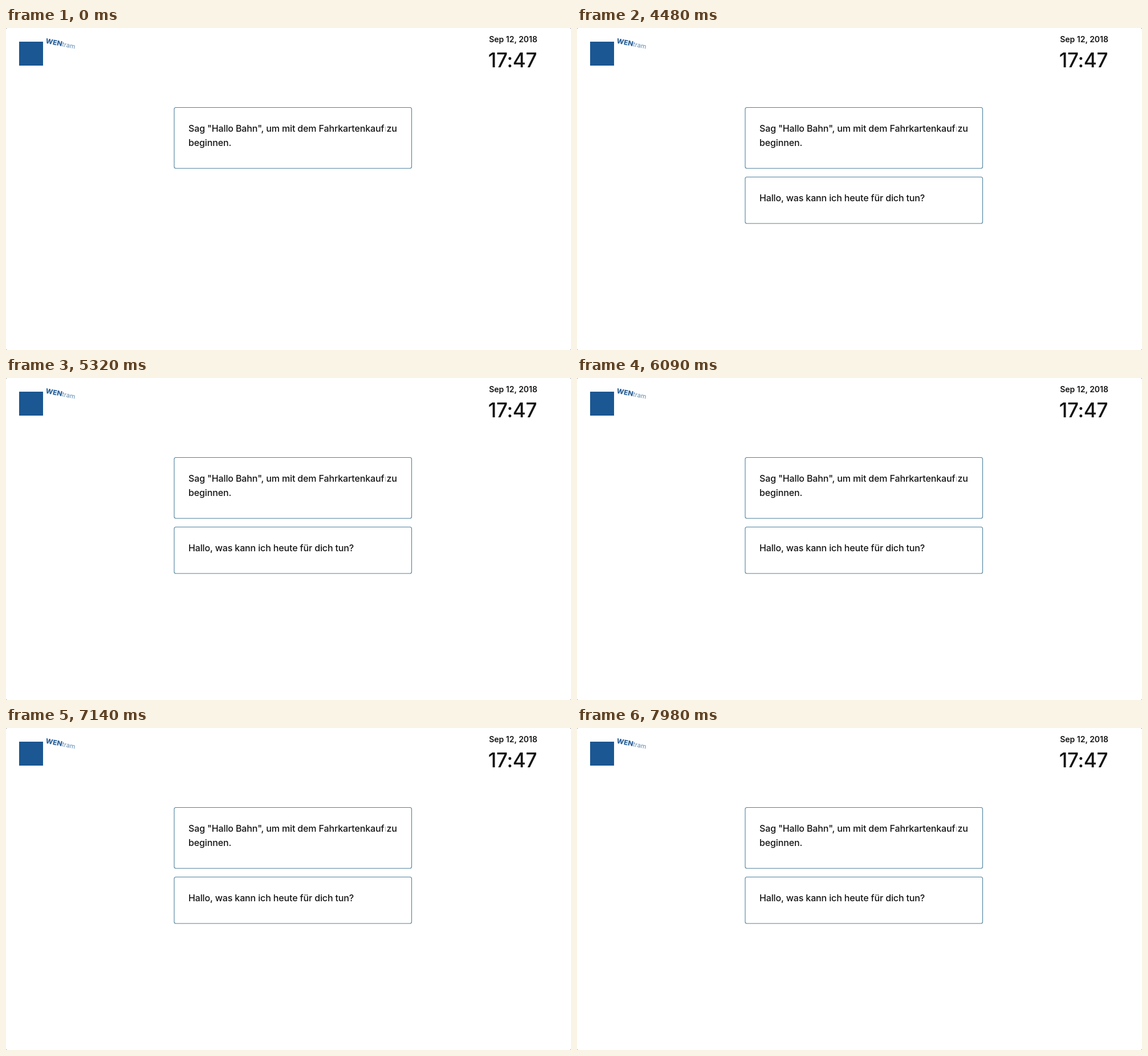
These frames come from a looping animation (991x565 px, 8 s). An HTML page:

```html
<!DOCTYPE html>
<html lang="de">
<head>
<meta charset="utf-8">
<title>Fahrkartenkauf</title>
<style>
  html, body { margin: 0; width: 100%; height: 100%; overflow: hidden; background: #fff; }
  svg { display: block; width: 991px; height: 565px; }
  text { font-family: Inter, "Liberation Sans", sans-serif; fill: #141414; }
  .card rect { fill: #fff; stroke: #4f819f; stroke-width: 1.1; }
  .card text { font-size: 16px; font-weight: 450; letter-spacing: -0.14px; }
  .date { font-size: 14px; font-weight: 600; text-anchor: end; }
  .clock { font-size: 35px; font-weight: 500; letter-spacing: -0.3px; text-anchor: middle; }
  .brand { font-size: 12px; font-weight: 800; fill: #2a6199; }
  .brand .thin { font-size: 11px; font-weight: 400; fill: #6288ae; }
</style>
</head>
<body>
<svg viewBox="0 0 991 565" xmlns="http://www.w3.org/2000/svg">
  <!-- window with slightly rounded corners -->
  <rect width="991" height="565" fill="#8a8a8a"/>
  <rect width="991" height="565" rx="2.5" fill="#fff"/>

  <rect x="23" y="24" width="42" height="42" fill="#1b5793"/>
  <text class="brand" transform="translate(69 26.5) rotate(11)">WEN<tspan class="thin">tram</tspan></text>

  <text class="date" x="932" y="24.5">Sep 12, 2018</text>
  <text class="clock" x="888.5" y="69">17:47</text>

  <g class="card">
    <rect x="295" y="139.5" width="416.5" height="106.8" rx="3"/>
    <text x="320" y="182.3">Sag "Hallo Bahn", um mit dem Fahrkartenkauf zu</text>
    <text x="320" y="206.6">beginnen.</text>
    <path d="M665.5 173V181.5" stroke="#999" stroke-width="0.8"/>
  </g>

  <g class="card" id="reply" visibility="hidden">
    <rect x="295" y="261.5" width="416.5" height="81.5" rx="3"/>
    <text x="320" y="304.1">Hallo, was kann ich heute für dich tun?</text>
  </g>
</svg>
<script>
  const LOOP = 8000;
  const REPLY_AT = 4480;
  const reply = document.getElementById('reply');
  const start = performance.now();

  function render() {
    const time = (performance.now() - start) % LOOP;
    reply.setAttribute('visibility', time >= REPLY_AT ? 'visible' : 'hidden');
    requestAnimationFrame(render);
  }
  render();
</script>
</body>
</html>
```
